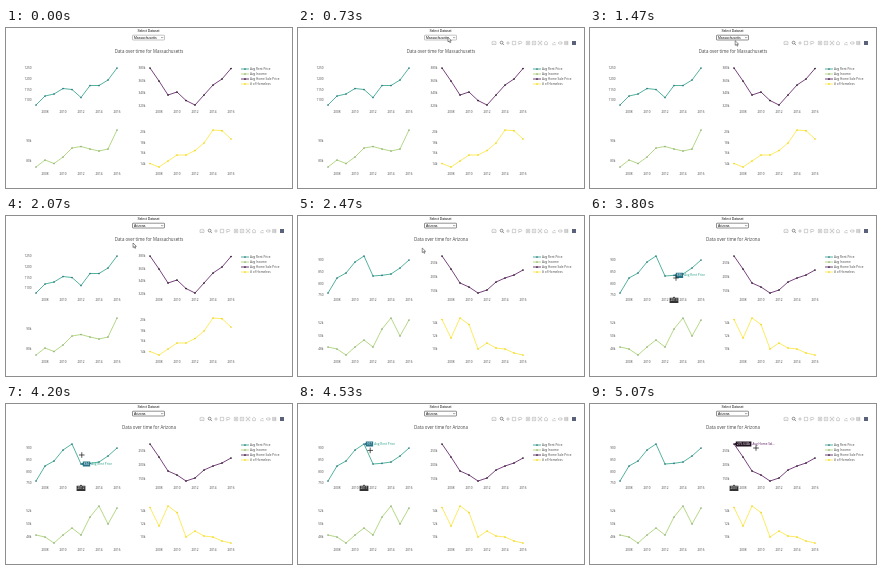
An HTML page that plays this animation: 286 by 160 pixels, repeating every 5140 ms.

```html
<!DOCTYPE html>
<html lang="en">
<head>
<meta charset="utf-8">
<title>Data over time</title>
<style>
html, body { margin: 0; width: 100%; height: 100%; overflow: hidden; background: #fff; }
svg { display: block; width: 100vw; height: 100vh; }
text { font-family: "Open Sans", "Noto Sans", sans-serif; font-size: 3.1px; fill: #444; }
.ui { font-family: "Liberation Sans", Arial, sans-serif; font-size: 3.4px; fill: #111; }
.title { font-size: 4.4px; }
.mid { text-anchor: middle; }
.end { text-anchor: end; }
.icon { fill: none; stroke: #444; stroke-width: .7; opacity: .35; }
.icon.on { opacity: .8; }
</style>
</head>
<body>
<svg id="stage" viewBox="0 0 286 160"></svg>
<script>
const LOOP = 5140, STEP = LOOP / 77;
const NS = "http://www.w3.org/2000/svg";
const stage = document.getElementById("stage");

function add(parent, tag, attrs, label) {
  const el = document.createElementNS(NS, tag);
  for (const key in attrs) el.setAttribute(key, attrs[key]);
  if (label !== undefined) el.textContent = label;
  parent.append(el);
  return el;
}
const group = (parent = stage) => add(parent, "g", {});
const text = (parent, x, y, label, cls = "") => add(parent, "text", { x, y, class: cls }, label);
const show = (el, on) => el.setAttribute("visibility", on ? "visible" : "hidden");

// Trace name, line colour, marker colour, first x, axis label y
const traces = [
  ["Avg Rent Price", "#27a085", "#287487", 30, 84],
  ["Avg Income", "#a3cf68", "#8fae7c", 30, 146],
  ["Avg Home Sale Price", "#57145f", "#21101f", 144, 84],
  ["# of Homeless", "#fbe63c", "#f0d51f", 144, 146]
];

// Per trace: point heights, then tick labels with first y and spacing
const states = {
  Massachusetts: [
    [[77, 68, 66, 60.5, 61.5, 69.5, 57.5, 57.5, 52, 40], ["1250", "1200", "1150", "1100"], 40, 10.7],
    [[139, 132, 135.5, 129, 120, 118.5, 121, 123, 121, 102], ["90k", "80k"], 113, 20],
    [[40, 53, 67, 64, 72.5, 77, 67, 57, 51, 40.5], ["380k", "360k", "340k", "320k"], 40, 12.5],
    [[135.5, 139, 133, 127, 127, 122.5, 115, 102, 102.7, 111], ["20k", "18k", "16k", "14k"], 104, 10.5]
  ],
  Arizona: [
    [[77, 62, 57, 46, 40, 60, 59.3, 58, 52, 44], ["900", "850", "800", "750"], 44, 11.7],
    [[131, 133, 139, 131, 124, 131, 113, 102, 120, 104], ["52k", "50k", "48k"], 107, 13],
    [[40, 53, 67, 71, 77, 74, 66, 62, 59, 54], ["250k", "200k", "150k"], 47, 14],
    [[103.5, 122, 102, 108.5, 133, 127, 132, 133, 137, 139], ["14k", "12k", "10k"], 107, 13]
  ]
};

function drawState(name) {
  const g = group();
  text(g, 143, 24.5, "Data over time for " + name, "title mid");
  states[name].forEach(([ys, ticks, top, gap], i) => {
    const [, line, dot, x0] = traces[i];
    const pts = ys.map((y, k) => [x0 + 9 * k, y]);
    ticks.forEach((tick, k) => text(g, x0 - 4.5, top + gap * k + 1.1, tick, "end"));
    add(g, "polyline", { points: pts.join(" "), fill: "none", stroke: line, "stroke-width": .8, "stroke-linejoin": "round" });
    pts.forEach(([cx, cy]) => add(g, "circle", { cx, cy, r: .85, fill: dot }));
  });
  return g;
}

function drawFrame() {
  text(stage, 142.5, 4, "Select Dataset", "mid ui");
  traces.forEach(([name, line, dot, x0, axis], i) => {
    for (let k = 0; k < 5; k++) text(stage, x0 + 9 + 18 * k, axis + 1.1, 2008 + 2 * k, "mid");
    const y = 41 + 5 * i;
    add(stage, "path", { d: `M235 ${y}h8`, stroke: line, "stroke-width": .8 });
    add(stage, "circle", { cx: 239, cy: y, r: .85, fill: dot });
    text(stage, 244, y + 1.1, name);
  });
}

// Toolbar icons as small paths around their centres
function drawToolbar() {
  const g = group();
  const box = "M-1.7-1.7h3.4v3.4h-3.4z";
  const icons = [
    [196, "M-2-1.2h1l.5-.6h1l.5.6h1v2.7h-4zM-.6.2h1.2"],
    [204, "M1-.4a1.4 1.4 0 1 1-2.8 0a1.4 1.4 0 1 1 2.8 0M.6.7l1.4 1.4"],
    [210, "M-2 0h4M0-2v4"],
    [216, box],
    [222, "M-1.8-.5a1.8 1.2 0 1 1 3.6 0a1.8 1.2 0 1 1-3.6 0M-.8.6l-.6 1.4"],
    [230, box + "M-1 0h2M0-1v2"],
    [236, box + "M-1 0h2"],
    [242, "M-1.8-.6v-1.2h1.2M.6-1.8h1.2v1.2M1.8.6v1.2h-1.2M-.6 1.8h-1.2v-1.2M-1-1l2 2M1-1l-2 2"],
    [248, "M-2 0l2-1.8l2 1.8M-1.3 0v1.7h2.6v-1.7"],
    [256, "M-1.8 1.7h3.6M-1.5.8l1.5-1.5l1.5.6"],
    [262, "M-2 0l1-1h3v2h-3z"],
    [268, "M-2-1l.6-.6h3.4v1.2h-3.4zM-2 1l.6-.6h3.4v1.2h-3.4z"]
  ];
  for (const [x, d] of icons)
    add(g, "path", { d, transform: `translate(${x} 15)`, class: x === 204 ? "icon on" : "icon" });
  add(g, "rect", { x: 274, y: 13, width: 4, height: 4, fill: "#59627a" });
  return g;
}

function drawSelect() {
  const frame = add(stage, "rect", { x: 126.5, y: 7.2, width: 32, height: 4.8, rx: .5, fill: "#fff", stroke: "#888", "stroke-width": .5 });
  const value = text(stage, 128, 10.8, "Massachusetts", "ui");
  add(stage, "path", { d: "M155.2 9.1l1 1l1-1", fill: "none", stroke: "#333", "stroke-width": .5 });
  return { frame, value };
}

// Hover label for one point: trace, point index, value, caption
function drawHover(trace, k, value, caption) {
  const [, line, fill, x0, axis] = traces[trace];
  const x = x0 + 9 * k, y = states.Arizona[trace][0][k];
  const w = value.length * 1.65 + 2.4;
  const g = group();
  add(g, "path", { d: `M${x} ${y}l1.8-1.3v-1.3h${w}v5.2h-${w}v-1.3z`, fill });
  text(g, x + 1.8 + w / 2, y + 1.1, value, "mid").style.fill = "#fff";
  text(g, x + w + 3, y + 1.1, caption).style.fill = line;
  add(g, "path", { d: `M${x} ${axis - 3.6}l1.2 1.3h3.2v5.2h-8.8v-5.2h3.2z`, fill: "#333" });
  text(g, x, axis + 1.4, 2007 + k, "mid").style.fill = "#fff";
  return g;
}

drawFrame();
const charts = { Massachusetts: drawState("Massachusetts"), Arizona: drawState("Arizona") };
const toolbar = drawToolbar();
const select = drawSelect();
const rent = "Avg Rent Price";
const hovers = {
  r11: drawHover(0, 4, "917", rent),
  r12: drawHover(0, 5, "834", rent),
  r13: drawHover(0, 6, "836", rent),
  r14: drawHover(0, 7, "841", rent),
  r15: drawHover(0, 8, "866", rent),
  h07: drawHover(2, 0, "275.634k", "Avg Home Sal...")
};
const arrow = add(stage, "path", { d: "M0 0v4.6l1.1-1l.8 1.8l.8-.4l-.8-1.7h1.5z", fill: "#fff", stroke: "#111", "stroke-width": .45 });
const cross = add(stage, "path", { d: "M-2.8 0h5.6M0-2.8v5.6", stroke: "#111", "stroke-width": .7 });

// Start time and hovered point
const hoverSteps = [
  [0, ""], [2660, "r15"], [2800, "r14"], [3400, "r15"], [3600, "r14"], [3730, "r13"],
  [4130, "r12"], [4330, "r11"], [4935, "h07"]
];

// Pointer path: time, x, y
const path = [
  [70, 4, 72], [270, 70, 48], [530, 150, 10], [870, 150, 9], [1330, 150, 9], [1800, 127, 27],
  [2400, 127, 27], [2530, 122, 36], [2800, 100, 55], [2930, 98, 58], [3130, 96, 58],
  [3330, 96, 58], [3460, 103, 58], [3730, 88, 61], [3800, 86, 62], [3930, 85, 61],
  [4330, 73, 48], [4530, 72, 46], [4800, 72, 46], [4935, 120, 45], [5070, 166, 44], [LOOP, 166, 44]
];

function pointAt(t) {
  const i = Math.max(1, path.findIndex(p => p[0] >= t));
  const [t0, x0, y0] = path[i - 1], [t1, x1, y1] = path[i];
  const f = Math.min(1, Math.max(0, (t - t0) / (t1 - t0)));
  const e = f * f * (3 - 2 * f);
  return [x0 + (x1 - x0) * e, y0 + (y1 - y0) * e];
}

function render(now) {
  const t = Math.floor((now % LOOP + 5) / STEP) * STEP % LOOP;
  const switched = t >= 2190;
  show(charts.Massachusetts, !switched);
  show(charts.Arizona, switched);
  show(toolbar, t >= 130);
  select.value.textContent = t >= 1925 ? "Arizona" : "Massachusetts";
  select.frame.setAttribute("stroke", t >= 1325 ? "#222" : "#888");

  const active = hoverSteps.filter(s => t >= s[0]).pop()[1];
  for (const key in hovers) show(hovers[key], key === active);

  const overPlot = t >= 2520;
  show(arrow, t >= 60 && !overPlot);
  show(cross, overPlot);
  (overPlot ? cross : arrow).setAttribute("transform", `translate(${pointAt(t)})`);
}

const start = performance.now();
function tick() {
  render(performance.now() - start);
  requestAnimationFrame(tick);
}
tick();
</script>
</body>
</html>
```
